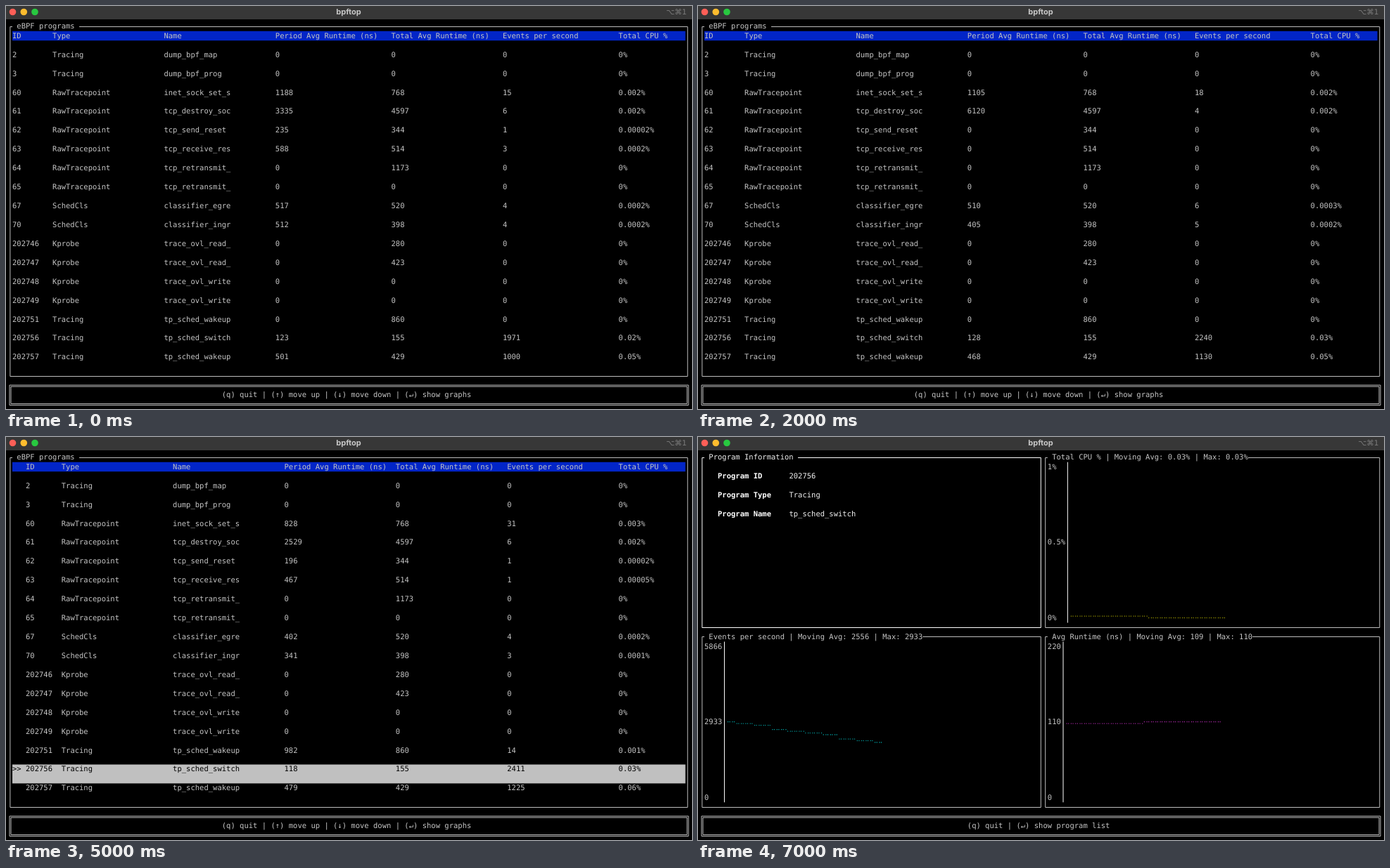
Recreate the animation shown at these times as an HTML page. Size 975 px wide and 574 px high, loop 8000 ms.

```html
<!DOCTYPE html>
<html lang="en">
<head>
<meta charset="utf-8">
<title>bpftop</title>
<style>
  html, body { margin: 0; width: 100%; height: 100%; overflow: hidden; background: #000; }
  svg { display: block; }
  text { font: 10.52px "DejaVu Sans Mono", monospace; fill: #c4c4c4; white-space: pre; text-rendering: geometricPrecision; }
  text.dark { fill: #000; }
  text.bright { fill: #f0f0f0; }
  text.bold { fill: #fff; font-weight: bold; }
  text.title { font: bold 11px Inter, sans-serif; fill: #c8c8c8; text-anchor: middle; }
  text.keys { font: 10.5px "DejaVu Sans", sans-serif; fill: #7c7c7c; text-anchor: end; }
  path { fill: none; stroke: #bdbdbd; }
  path.bright { stroke: #fff; }
</style>
</head>
<body>
<svg width="975" height="574" viewBox="0 0 975 574">
  <rect width="975" height="574"/>
  <rect width="975" height="19" fill="#373737"/>
  <circle cx="9.5" cy="8.5" r="4.8" fill="#ff5f57"/>
  <circle cx="25.3" cy="8.5" r="4.8" fill="#febc2e"/>
  <circle cx="41" cy="8.5" r="4.8" fill="#28c840"/>
  <text class="title" x="487" y="12">bpftop</text>
  <text class="keys" x="967.5" y="11.5">⌥⌘1</text>
  <g id="screen"></g>
</svg>
<script>
const STEP = 1000, STEPS = 8;
const screenEl = document.getElementById("screen");

// Terminal grid: left edge of a column, top edge of a row
const cellW = 6.335, cellH = 13.46;
const X = col => 2.7 + cellW * col;
const Y = row => 22.3 + cellH * row;
const midX = col => X(col + 0.5);
const midY = row => Math.floor(Y(row + 0.5)) + 0.5;

const text = (col, row, s, cls = "") =>
  `<text class="${cls}" x="${X(col).toFixed(2)}" y="${Math.round(Y(row) + 10)}">${s}</text>`;
const bar = (row, rows, fill) =>
  `<rect x="${X(1)}" y="${Y(row)}" width="${151 * cellW}" height="${rows * cellH}" fill="${fill}"/>`;
const path = (d, cls = "") => `<path class="${cls}" d="${d}"/>`;

// Frame through cell centres with a title cut into its top edge
function box(c0, r0, c1, r1, title, cls = "") {
  const l = midX(c0), r = midX(c1), t = midY(r0), b = midY(r1);
  return path(`M${X(c0 + 1)} ${t}H${l}V${b}H${r}V${t}H${X(c0 + 1 + title.length)}`, cls)
    + text(c0 + 1, r0, title, cls);
}

function footer(col, s) {
  return path("M5 540H970V568.5H5ZM7 542H968V566.5H7Z") + text(col, 39, s);
}

const programs = `2 Tracing dump_bpf_map 0
3 Tracing dump_bpf_prog 0
60 RawTracepoint inet_sock_set_s 768
61 RawTracepoint tcp_destroy_soc 4597
62 RawTracepoint tcp_send_reset 344
63 RawTracepoint tcp_receive_res 514
64 RawTracepoint tcp_retransmit_ 1173
65 RawTracepoint tcp_retransmit_ 0
67 SchedCls classifier_egre 520
70 SchedCls classifier_ingr 398
202746 Kprobe trace_ovl_read_ 280
202747 Kprobe trace_ovl_read_ 423
202748 Kprobe trace_ovl_write 0
202749 Kprobe trace_ovl_write 0
202751 Tracing tp_sched_wakeup 860
202756 Tracing tp_sched_switch 155
202757 Tracing tp_sched_wakeup 429`.split("\n").map(line => line.split(" "));

// Active programs per second, as id:period/events[/total]
const samples = [
  "60:1188/15 61:3335/6 62:235/1 63:588/3 67:517/4 70:512/4 202756:123/1971 202757:501/1000",
  "60:902/14 61:9052/2 67:882/3 70:422/3 202756:134/2485 202757:457/1274",
  "60:1105/18 61:6120/4 67:510/6 70:405/5 202756:128/2240 202757:468/1130",
  "60:1317/21 61:7902/3 67:440/15 70:389/12 202746:294/48 202747:454/48 202751:1089/4 202756:119/2121 202757:475/1073",
  "60:755/34 61:8057/8/4598 67:344/7 70:338/8 202746:231/52 202747:311/52 202756:106/2267 202757:464/1145",
  "60:828/31 61:2529/6 62:196/1 63:467/1 67:402/4 70:341/3 202751:982/14 202756:118/2411 202757:479/1225"
].map(s => Object.fromEntries(s.split(" ").map(e => e.split(":"))));

const headers = ["ID", "Type", "Name", "Period Avg Runtime (ns)",
  "Total Avg Runtime (ns)", "Events per second", "Total CPU %"];
const cpu = (period, events) => period * events ? (period * events / 1e7).toPrecision(1) + "%" : "0%";

function list(sample, selected) {
  const cols = selected < 0 ? [1, 10, 35, 60, 86, 111, 137] : [4, 12, 37, 62, 87, 112, 137];
  const line = (row, cells, cls) => cells.map((s, i) => text(cols[i], row, s, cls)).join("");
  let out = box(0, 0, 152, 37, " eBPF programs ") + bar(1, 1, "#0225c7") + line(1, headers);
  programs.forEach(([id, type, name, avg], i) => {
    const row = 3 + 2 * i, on = i === selected;
    const [period, events, total = avg] = (sample[id] || "0/0").split("/");
    if (on) out += bar(row, 2, "#c0c0c0") + text(1, row, "&gt;&gt;", "dark");
    out += line(row, [id, type, name, period, total, events, cpu(period, events)], on ? "dark" : "");
  });
  return out + footer(48, "(q) quit | (↑) move up | (↓) move down | (↵) show graphs");
}

// Braille line: two dots across and four down per cell
function dots(col, from, to, count, color) {
  let out = "";
  for (let i = 0; i < count; i++) {
    const level = Math.round(from + (to - from) * i / 69);
    const x = X(col + (i >> 1)) + (i % 2 ? 4.5 : 1.9);
    const y = Y(level >> 2) + 4 + 2.46 * (level % 4);
    out += `<circle cx="${x.toFixed(2)}" cy="${y.toFixed(2)}" r=".66" fill="${color}"/>`;
  }
  return out;
}

function chart(c0, r0, c1, title, labels, axis, line) {
  return box(c0, r0, c1, r0 + 18, " " + title)
    + labels.map((s, i) => text(c0 + 1, r0 + 1 + 8 * i, s)).join("")
    + path(`M${midX(axis)} ${Y(r0 + 1)}V${Y(r0 + 18)}`, "bright")
    + dots(axis + 1, ...line);
}

function graphs(first) {
  const count = first ? 1 : 70;
  const [eventsAvg, runAvg, runMax] = first ? [2933, 108, 108] : [2556, 109, 110];
  const info = [["ID", "202756"], ["Type", "Tracing"], ["Name", "tp_sched_switch"]];
  return box(0, 0, 76, 18, " Program Information ", "bright")
    + info.map(([key, value], i) =>
        text(4, 2 + 2 * i, "Program " + key, "bold") + text(20, 2 + 2 * i, value, "bright")).join("")
    + chart(77, 0, 152, "Total CPU % | Moving Avg: 0.03% | Max: 0.03%",
        ["1%", "0.5%", "0%"], 82, [68, 69, count, "#c7c400"])
    + chart(0, 19, 76, `Events per second | Moving Avg: ${eventsAvg} | Max: 2933`,
        [5866, 2933, 0], 5, [113, 122, count, "#00c5c7"])
    + chart(77, 19, 152, `Avg Runtime (ns) | Moving Avg: ${runAvg} | Max: ${runMax}`,
        [2 * runMax, runMax, 0], 81, [first ? 113 : 114, 113, count, "#ca30c7"])
    + footer(60, "(q) quit | (↵) show program list");
}

let shown = -1;
function draw(now) {
  const step = Math.floor(now / STEP) % STEPS;
  if (step !== shown) {
    shown = step;
    const selected = step < 4 ? -1 : 20 - step;
    screenEl.innerHTML = step < 6 ? list(samples[step], selected) : graphs(step === 6);
  }
  requestAnimationFrame(draw);
}
draw(performance.now());
</script>
</body>
</html>
```
